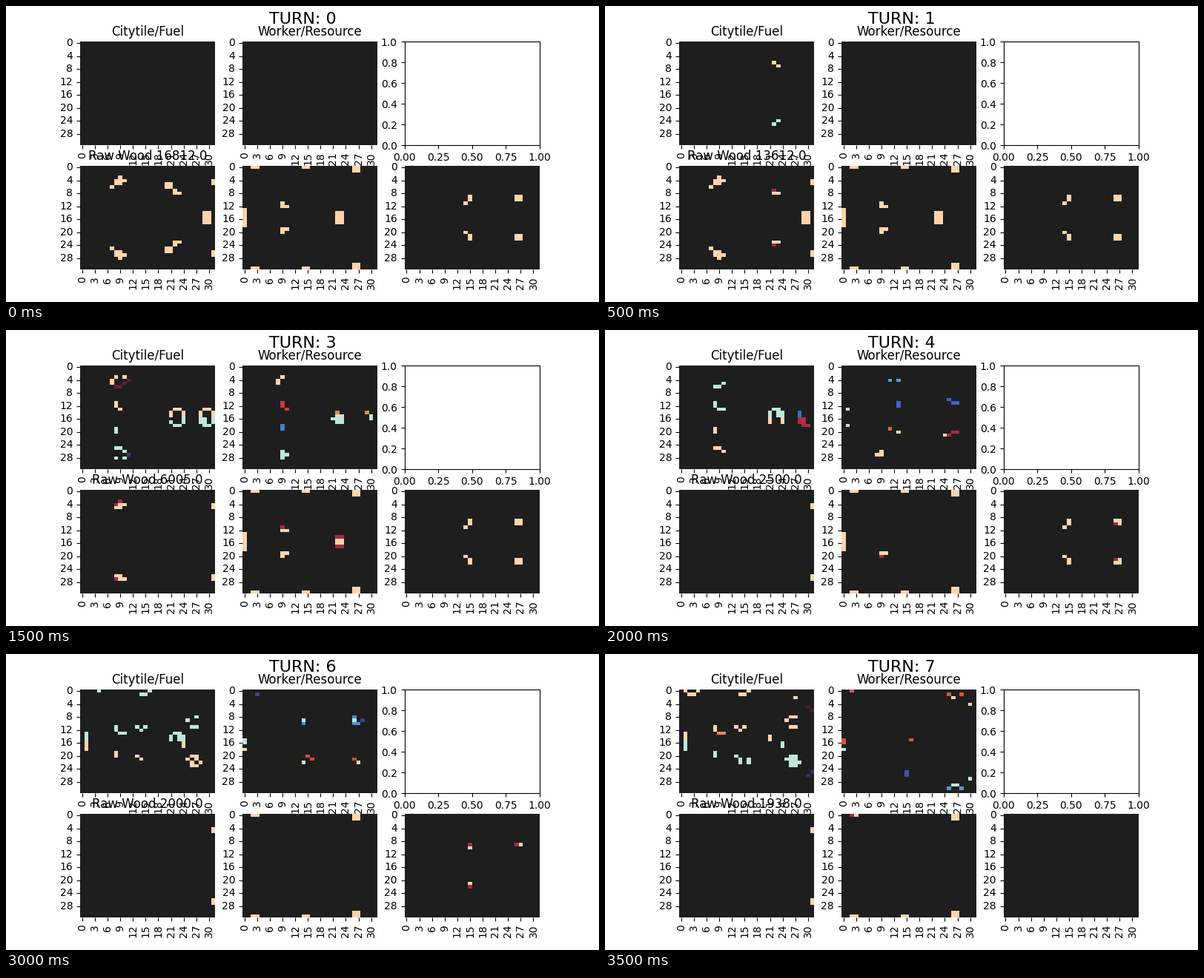
These frames come from a looping animation (800 by 400 pixels, 4000 ms). A matplotlib script:

```python
import numpy as np
import matplotlib.pyplot as plt
from matplotlib.animation import FuncAnimation
from matplotlib.colors import LinearSegmentedColormap

plt.rcParams["font.family"] = "DejaVu Sans"

SIZE, TURNS, NEVER = 32, 8, 99
WOOD_LEFT = [16812, 13612, 10612, 6005, 2500, 2000, 2000, 1938]
STEP = {"N": (0, -1), "S": (0, 1), "W": (-1, 0), "E": (1, 0), "C": (0, 0)}

STOPS = [(-1, "#bde7db"), (-.86, "#8fcdd7"), (-.7, "#55a3cd"),
         (-.55, "#3f83d1"), (-.42, "#4560c8"), (-.3, "#474a9a"),
         (-.15, "#34365a"), (0, "#1e1e1e"), (.15, "#4a222e"),
         (.3, "#7a2840"), (.43, "#a72d47"), (.55, "#cb3b3f"),
         (.68, "#e15a36"), (.8, "#f18748"), (.9, "#faac75"), (1, "#ffd4ac")]
ICE_FIRE = LinearSegmentedColormap.from_list(
    "ice_fire", [((v + 1) / 2, c) for v, c in STOPS], N=255)

city, worker, wood, coal, uranium = np.zeros((5, TURNS, SIZE, SIZE))


def cells(*rects):
    """Expand (col, row) or (col, row, width, height) into single cells."""
    out = set()
    for x, y, *wh in rects:
        w, h = wh or (1, 1)
        out |= {(x + i, y + j) for i in range(w) for j in range(h)}
    return out


def deposit(board, north_end, south_end, *rects):
    """Mirrored resource patch; in its last turn one cell is nearly dug out."""
    patch = cells(*rects)
    for t in range(TURNS):
        for x, y in patch:
            for row, end in ((y, north_end), (SIZE - 1 - y, south_end)):
                worn = t == end - 1 > 0 and (x, y) == min(patch)
                board[t, row, x] = (t < end) * (.4 if worn else 1)
    return patch


def around(patch, sides):
    """Cells next to the patch on the given sides; C is the patch itself."""
    out = set()
    for side in sides:
        dx, dy = STEP[side]
        ring = {(x + dx, y + dy) for x, y in patch}
        out |= ring if side == "C" else ring - patch
    return {(x, y) for x, y in out if 0 <= x < SIZE and 0 <= y < SIZE // 2}


def mark(board, turn, spots, south, fuel):
    """South is the mirror of north; the players swap signs every turn."""
    sign = 1 if (turn % 2 == 1) != south else -1
    for x, y in spots:
        row = SIZE - 1 - y if south else y
        if board is worker or not worker[turn, row, x]:
            board[turn, row, x] = sign * fuel


def walk(turn, fuel, both=(), north=(), south=()):
    mark(worker, turn, cells(*both, *north), False, fuel)
    mark(worker, turn, cells(*both, *south), True, fuel)


def settle(patch, turns, north="", south="", fuel=1):
    for t in turns:
        mark(city, t, around(patch, north), False, fuel)
        mark(city, t, around(patch, south), True, fuel)


# Resource patches of the northern half
peak = deposit(wood, 4, 3, (9, 3))
grove = deposit(wood, 4, 4, (8, 4, 3, 1), (8, 5, 2, 1))
tree = deposit(wood, 3, 3, (7, 6))
glade = deposit(wood, 1, 1, (20, 5, 2, 2))
thicket = deposit(wood, 2, 2, (22, 7), (22, 8, 2, 1))
east_a, east_b = (deposit(wood, 3, 3, (x, 14, 1, 2)) for x in (29, 30))
edge = deposit(wood, NEVER, NEVER, (31, 4, 1, 2))
hook = deposit(coal, 4, 5, (9, 11), (9, 12, 2, 1))
mid_a, mid_b = (deposit(coal, 4, 4, (x, 14, 1, 2)) for x in (22, 23))
west = deposit(coal, 6, 6, (0, 13, 1, 3))
top_a = deposit(coal, TURNS, NEVER, (2, 0, 2, 1))
top_b = deposit(coal, 6, NEVER, (14, 0, 2, 1))
top_c = deposit(coal, NEVER, NEVER, (26, 0, 2, 2))
shaft = deposit(uranium, 7, 7, (15, 9, 1, 2))
pit = deposit(uranium, 6, 6, (14, 11))
vein_a = deposit(uranium, 7, 6, (26, 9, 2, 1))
vein_b = deposit(uranium, 5, 5, (26, 10, 2, 1))

# Workers come first: no city tile is built where one stands
walk(2, .2, both=[(22, 13, 2, 2)])
walk(2, .4, north=[(7, 7), (9, 10)], south=[(6, 6), (7, 5)])
walk(2, 1, both=[(29, 14)], south=[(30, 15, 1, 2)])

walk(3, 1, north=[(9, 3), (8, 4, 1, 2), (23, 15)],
     south=[(9, 3, 1, 3), (10, 4), (21, 15, 3, 1), (22, 14, 2, 1),
            (22, 16), (30, 15, 1, 2)])
walk(3, .8, north=[(22, 14), (29, 14)])
walk(3, .55, north=[(9, 11, 1, 2), (10, 13)], south=[(9, 12, 1, 2)])

walk(4, 1, both=[(1, 13)], south=[(13, 11), (24, 10), (9, 5), (8, 4, 2, 1)])
walk(4, .42, both=[(25, 10), (26, 11, 2, 1)], north=[(13, 11, 1, 2)])
walk(4, .68, north=[(11, 4), (13, 4)], south=[(11, 12)])

walk(5, 1, both=[(14, 10), (26, 10)])

walk(6, 1, both=[(14, 9)], north=[(26, 9), (0, 15, 1, 2)],
     south=[(0, 13), (27, 9)])
walk(6, .6, both=[(26, 10)], north=[(14, 10), (26, 8), (27, 10)],
     south=[(15, 11), (16, 10)])
walk(6, .25, north=[(3, 1), (28, 9)])

walk(7, 1, both=[(30, 4), (26, 2)], south=[(27, 2), (0, 13)])
walk(7, .65, both=[(25, 1), (28, 1)], north=[(2, 0), (16, 15), (0, 15, 1, 2)])
walk(7, .34, south=[(15, 5, 1, 2)])

# Cities grow along the sides of the patches
settle(thicket, [1], "N", "N")
settle(thicket, [2], "NWE", "NES")
settle(glade, [2], "S")

settle(peak, (2, 3), "WE", "WE")
settle(tree, [2], "W", "W", fuel=.42)
settle(grove, [2], "WE", "WE", fuel=.5)
settle(grove, [2], "S", "S")
settle(grove, [3], "W")
settle(grove, [3], "ES", "E", fuel=.2)
settle(grove, (3, 4), south="S")
settle(grove, [4], "S")

settle(east_a, (2, 3), "NW", "NW")
settle(east_b, (2, 3), "NE", "NE")
settle(east_a, [3], south="C")
settle(east_a, [4], "W", "NWC", fuel=.45)
settle(east_b, [4], south="N", fuel=.45)

settle(hook, range(3, TURNS), "W", "W")
settle(hook, range(3, 7), "S")
settle(hook, [7], "S", fuel=.8)

settle(mid_a, [3], "NW", "NW")
settle(mid_b, [3], "NE", "NE")
settle(mid_a, (4, 5, 6), "NW")
settle(mid_b, (4, 5, 6), "NEC")
settle(mid_a, [4], south="W")
settle(mid_b, range(4, TURNS), south="E")
settle(mid_a, [7], "W")

settle(west, (5, 6, 7), "E", "E")
settle(top_a, [6], "E")
settle(top_a, [7], "WES")
settle(top_b, (6, 7), "ES")
settle(top_c, [7], "S")
settle(edge, [7], "WS", "WS", fuel=.15)

settle(pit, (5, 6, 7), "WES", "WN")
settle(shaft, [7], south="WE")
settle(vein_a, (6, 7), "NW"[:2], "CEN")
settle(vein_b, (5, 6, 7), "S", "SWC")


def heatmap(ax, board):
    mesh = ax.pcolormesh(board[0], cmap=ICE_FIRE, vmin=-1, vmax=1)
    ax.set(xlim=(0, SIZE), ylim=(SIZE, 0))
    ax.spines[:].set_visible(False)
    cols, rows = np.arange(0, SIZE, 3), np.arange(0, SIZE, 4)
    ax.set_xticks(cols + .5, cols, rotation="vertical")
    ax.set_yticks(rows + .5, rows, va="center")
    return mesh


fig, axes = plt.subplots(2, 3, figsize=(8, 4), dpi=100)
heading = fig.suptitle("TURN: 0", fontsize=16)
axes[0, 0].set_title("Citytile/Fuel")
axes[0, 1].set_title("Worker/Resource")
wood_title = axes[1, 0].set_title("")

boards = [city, worker, wood, coal, uranium]
panels = [*axes[0, :2], *axes[1]]
meshes = [heatmap(ax, board) for ax, board in zip(panels, boards)]


def update(turn):
    heading.set_text(f"TURN: {turn}")
    wood_title.set_text(f"Raw Wood {WOOD_LEFT[turn]:.1f}")
    for mesh, board in zip(meshes, boards):
        mesh.set_array(board[turn])
    return [heading, wood_title, *meshes]


anim = FuncAnimation(fig, update, frames=TURNS, interval=500,
                     repeat=True, repeat_delay=0, blit=False)
plt.show()
```
